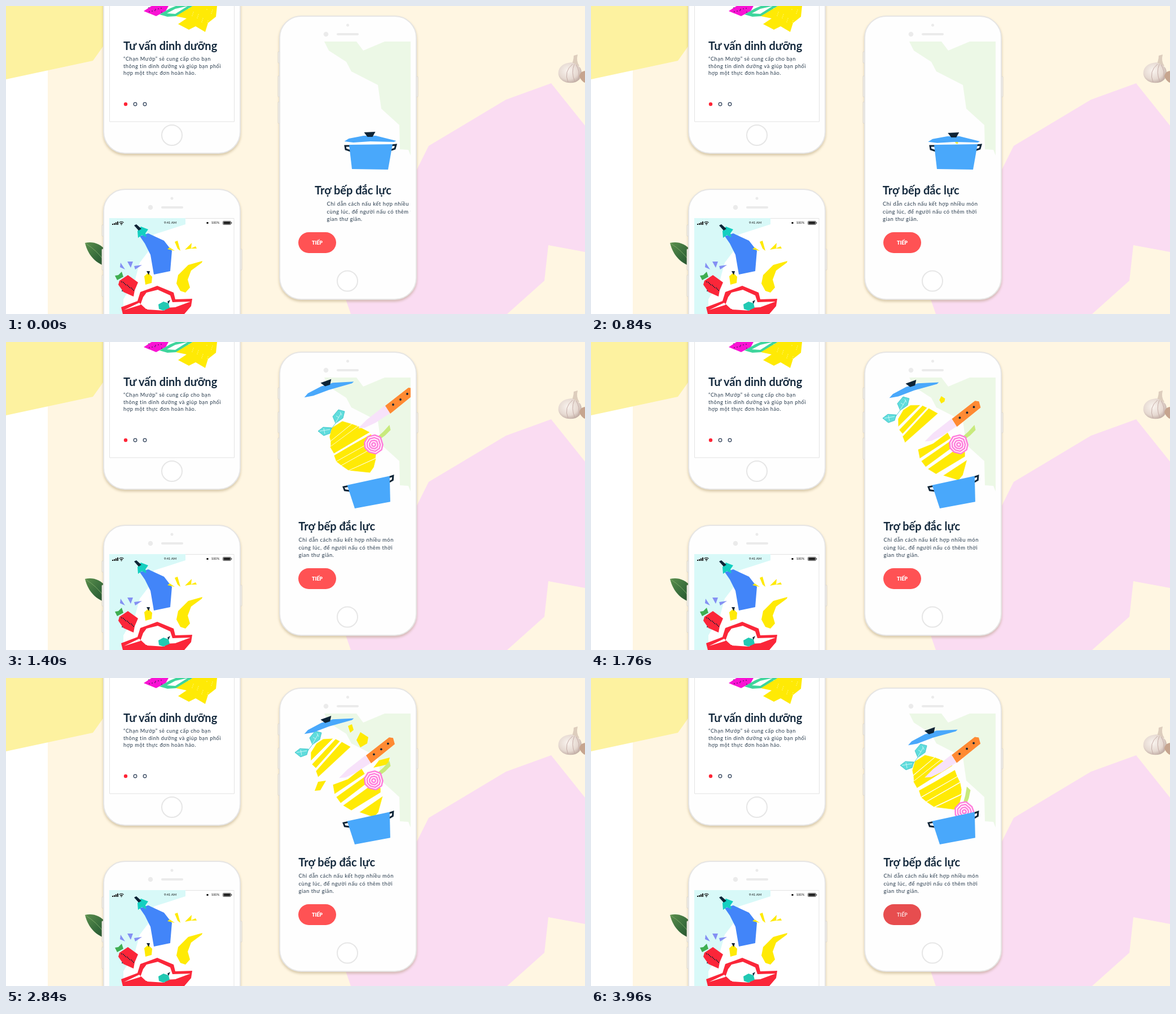
Animation of 1026x546 px, one loop 4000 ms. Source, as an HTML page:

```html
<!DOCTYPE html>
<html lang="vi">
<head>
<meta charset="utf-8">
<style>
html, body { margin: 0; width: 100%; height: 100%; overflow: hidden; background: #fff6e2; }
svg { display: block; width: 1026px; height: 546px; }
text { font-family: Lato, "Noto Sans", sans-serif; }
.title { font-size: 20px; font-weight: 700; fill: #14293d; }
.body { font-size: 9.4px; letter-spacing: .55px; fill: #26394b; }
.phone { fill: #fefefe; stroke: #e6e5e4; stroke-width: 2; filter: drop-shadow(0 3px 2px rgba(140,115,60,.34)); }
.side { fill: #fcfcfc; stroke: #dedbd6; stroke-width: .8; }
.grey { fill: #ebebeb; }
.home { fill: #fff; stroke: #e6e6e6; stroke-width: 2; }
.dark { fill: #0e2436; }
.yel { fill: #ffea05; }
.blue { fill: #49a8fb; }
</style>
</head>
<body>
<svg viewBox="0 0 1026 546" xmlns="http://www.w3.org/2000/svg">
<defs>
  <clipPath id="screen"><rect x="490" y="63" width="227" height="400"/></clipPath>
  <clipPath id="low"><rect x="183" y="376" width="221" height="170"/></clipPath>
  <linearGradient id="leafFill" x1="0" y1="0" x2="1" y2="1">
    <stop offset="0" stop-color="#5b8f4d"/><stop offset=".6" stop-color="#34693a"/><stop offset="1" stop-color="#234b2b"/>
  </linearGradient>
  <radialGradient id="bulb" cx=".42" cy=".4" r=".65">
    <stop offset="0" stop-color="#faf4ef"/><stop offset=".65" stop-color="#e6d9d1"/><stop offset="1" stop-color="#bda9a0"/>
  </radialGradient>
</defs>

<rect width="1026" height="546" fill="#fff6e2"/>
<rect y="100" width="74" height="446" fill="#fff"/>
<path d="M0 0H176V66L154 97 0 130Z" fill="#fdf2a0"/>
<path d="M602 520 729 288 749 248 886 166 966 137 1026 212V436L961 424 954 487 888 546H611Z" fill="#fadcf2"/>

<g>
  <path d="M1006 88 1013 86Q1010 98 1016 106L1000 108Q1006 98 1006 88Z" fill="#ddcdbd"/>
  <path d="M1002 100C986 101 977 110 979 122 982 134 996 139 1009 135 1019 131 1023 120 1018 110Q1012 103 1002 100Z" fill="url(#bulb)"/>
  <path d="M1004 103Q988 116 996 135M1007 103Q1001 118 1008 134M1010 104Q1018 116 1014 130" fill="none" stroke="#c6ada8" stroke-width="1"/>
  <path d="M1026 115Q1017 116 1016 125 1020 134 1026 136Z" fill="#c6a58f"/>
</g>
<path d="M140 420C153 417 166 420 178 434V462C160 456 146 444 140 420Z" fill="url(#leafFill)"/>
<path d="M141 421Q160 432 175 453" fill="none" stroke="#7ba869" stroke-width="1"/>

<!-- upper left phone -->
<rect class="phone" x="173" y="-240" width="242" height="501" rx="38"/>
<path d="M183.500 0V205H404.500V0" fill="#fff" stroke="#e3e3e3"/>
<circle class="home" cx="294" cy="229" r="18"/>
<path d="M244 9 258 0H288L283 9 266 18Z" fill="#f913d4"/>
<path d="M272 15 291 4 301 0H331L302 18 286 19Z" fill="#3ed59c"/>
<path d="M285 13 300 5 322 0 300 14Z" fill="#fff"/>
<path class="yel" d="M331 0 301 18 320 22 305 32 324 42 336 36 353 46 358 30 372 19 374 0Z"/>
<g id="specks" class="dark"></g>
<text class="title" x="208" y="78">Tư vấn dinh dưỡng</text>
<g class="body" style="font-size:9.2px;letter-spacing:.53px">
  <text x="208" y="97">“Chạn Mướp” sẽ cung cấp cho bạn</text>
  <text x="208" y="109.700">thông tin dinh dưỡng và giúp bạn phối</text>
  <text x="208" y="122.400">hợp một thực đơn hoàn hảo.</text>
</g>
<circle cx="212" cy="174" r="3.200" fill="#ff2436"/>
<g fill="#fff" stroke="#2a3c55" stroke-width="1.200"><circle cx="229" cy="174" r="2.800"/><circle cx="246" cy="174" r="2.800"/></g>

<!-- lower left phone -->
<g class="side">
  <rect x="170" y="388" width="4" height="20" rx="1"/><rect x="170" y="431" width="4" height="37" rx="1"/>
  <rect x="170" y="477" width="4" height="38" rx="1"/><rect x="414" y="431" width="4" height="37" rx="1"/>
</g>
<rect class="phone" x="173" y="325" width="242" height="501" rx="38"/>
<g class="grey"><circle cx="294" cy="341" r="2.500"/><circle cx="256" cy="357" r="4.300"/><rect x="275" y="355" width="39" height="4" rx="2"/></g>
<path d="M183.500 546V376.500H404V546" fill="#fff" stroke="#e3e3e3"/>
<g clip-path="url(#low)">
  <path d="M183 376H318V387L284 398 262 405 253 434 237 455 229 484 208 520V546H183Z" fill="#d8f9f8"/>
  <path d="M237 408 252 403 280 416 294 434 291 470 262 476 256 441 246 421Z" fill="#4285f9"/>
  <path d="M234 411 233 399 239 391 252 396 247 403 249 410 241 406Z" fill="#14cfc0"/>
  <path class="dark" d="M227 389 231 387 240 395 235 398Z"/>
  <path class="yel" d="M286 431 290 428 299 434ZM299 418 304 416 309 434 304 430ZM317 432 329 420 328 430ZM327 430 336 426 338 430Z"/>
  <path class="yel" d="M348 452 323 459 305 477 302 492 309 505 318 508 326 499 322 485 328 469 347 455Z"/>
  <path d="M203 455 211 467 202 463ZM215 453 225 453 221 464ZM227 461 241 459 229 467Z" fill="#8490f3"/>
  <path d="M193 478 199 477 205 471 208 480 197 486Z" fill="#3fae52"/>
  <path d="M201 487 216 477 234 490 228 504 226 515 208 507 199 494Z" fill="#fb2639"/>
  <path class="yel" d="M245 479 252 473 259 480 258 491 247 494Z"/>
  <path class="dark" d="M249 470 255 470 253 477Z"/>
  <path d="M204 534 233 523 238 507 268 496 297 508 300 520 330 519 328 532 316 546H207Z" fill="#fb2639"/>
  <path d="M243 516 249 508 269 503 291 513 295 525 327 524 300 534 248 537 236 526 209 539 238 530Z" fill="#fff"/>
  <path d="M246 514 268 506 288 514 294 528 280 540 250 538Z" fill="#fff"/>
  <path d="M270 529 279 524 288 527 290 535 279 540 271 537Z" fill="#21c9b3"/>
  <path class="dark" d="M286 524 291 521 288 528Z"/>
  <g id="seeds" class="dark"></g>
</g>
<g fill="#111">
  <path d="M188 386h2v2h-2zM191 385h2v3h-2zM194 383.500h2v4.500h-2zM197 382h2v6h-2z"/>
  <path d="M200.500 384Q204.500 380.500 208.500 384M202.300 386Q204.500 384 206.700 386" fill="none" stroke="#111" stroke-width="1.200"/>
  <circle cx="204.500" cy="387.500" r=".9"/>
  <rect x="355.500" y="383" width="3" height="3"/>
  <rect x="384.500" y="381.500" width="14" height="6" rx="1" fill="none" stroke="#111" stroke-width=".7"/>
  <rect x="385.500" y="382.500" width="12" height="4"/><rect x="399.300" y="383.500" width="1" height="2"/>
  <text x="291" y="386.300" font-size="5.800" text-anchor="middle">9:41 AM</text>
  <text x="371" y="386.300" font-size="5.800" text-anchor="middle">100%</text>
</g>

<!-- main phone -->
<g class="side">
  <rect x="482" y="81" width="4" height="20" rx="1"/><rect x="482" y="124" width="4" height="37" rx="1"/>
  <rect x="482" y="170" width="4" height="38" rx="1"/><rect x="726" y="125" width="4" height="36" rx="1"/>
</g>
<rect class="phone" x="485" y="18" width="242" height="502" rx="38"/>
<g class="grey"><circle cx="605.500" cy="34" r="2.500"/><circle cx="567" cy="50" r="4.300"/><rect x="586" y="48" width="39" height="4" rx="2"/></g>
<circle class="home" cx="605" cy="487.500" r="18"/>
<g clip-path="url(#screen)">
  <path d="M564 63H621L633 79 671 63H717V265L713 255 698 254 697 211 665 182 659 140 612 116 603 99 572 79Z" fill="#ecf8e6"/>
  <g id="lemon">
    <g id="slices" class="yel" stroke="#fff" stroke-width=".7"></g>
    <g id="leaves" fill="#5fdcdc" stroke="#35bfc4" stroke-width=".8">
      <path d="M575 156 584 144" fill="none"/>
      <path d="M579 132 589 120 600 123 597 135 584 144Z"/>
      <path d="M553 158 562 151 577 152 574 162 563 166Z"/>
      <path d="M584 143 594 126M556 158 574 155M585 131 590 134M592 124 595 130M563 153 565 163" stroke="#e2fbfa" fill="none"/>
    </g>
  </g>
  <g id="bits" class="yel"></g>
  <g id="knife">
    <path d="M589 178 604 163 636 138 646 151 620 168 601 177Z" fill="#f7e2fa"/>
    <path d="M637 138 678 106 685 107 688 118 646 152Z" fill="#ff8a33"/>
    <g class="dark"><circle cx="651" cy="136" r="1.900"/><circle cx="664" cy="127" r="1.900"/><circle cx="676" cy="117" r="1.900"/></g>
  </g>
  <g id="onion">
    <path d="M8-15 17-23 28-35 30-26 20-16 13-11Z" fill="#c8ea7c"/>
    <g id="rings" fill="#fff" stroke="#ff7fdc" stroke-linejoin="round"></g>
  </g>
  <g id="pot">
    <path d="M609 248 601 248 602 254 611 257M683 247 691 246 689 253 680 256" fill="none" stroke="#0e2436" stroke-width="3"/>
    <path class="blue" d="M608 246 685 245 677 290 613 289Z"/>
  </g>
  <g id="lid">
    <path class="blue" d="M-46 4-38-1-12-6 10-6 46 3 42 5 0 4-30 6Z"/>
    <path class="dark" d="M-11-12 9-13 4-4-5-4Z"/>
  </g>
  <text id="title" class="title" y="334">Trợ bếp đắc lực</text>
  <g id="copy" class="body">
    <text y="354">Chỉ dẫn cách nấu kết hợp nhiều món</text>
    <text y="367.500">cùng lúc, để người nấu có thêm thời</text>
    <text y="381">gian thư giãn.</text>
  </g>
</g>
<rect id="button" x="518" y="401" width="67" height="37" rx="18.500"/>
<text id="label" x="551.500" y="423" font-size="9" text-anchor="middle">TIẾP</text>
</svg>
<script>
const NS = 'http://www.w3.org/2000/svg';
const $ = id => document.getElementById(id);
const set = (el, attrs) => { for (const k in attrs) el.setAttribute(k, attrs[k]); return el; };
const add = (parent, tag, attrs = {}) => parent.appendChild(set(document.createElementNS(NS, tag), attrs));
const move = (id, value) => $(id).setAttribute('transform', value);
const about = (x, y, s) => `translate(${x} ${y}) scale(${s}) translate(${-x} ${-y})`;

const smooth = p => p * p * (3 - 2 * p);
const out = p => 1 - (1 - p) ** 3;

// Value at time t from [time, value] keys
function keyed(t, keys, ease = smooth) {
  if (t <= keys[0][0]) return keys[0][1];
  for (let i = 1; i < keys.length; i++) {
    const [a, v] = keys[i - 1], [b, w] = keys[i];
    if (t <= b) return v + (w - v) * ease((t - a) / (b - a));
  }
  return keys[keys.length - 1][1];
}

// Each slice: closed outline, then open outline
const slices = [
  [[573,168, 577,152, 596,140, 613,145, 575,176], [540,132, 550,116, 562,108, 580,107, 540,147]],
  [[613,145, 624,149, 575,186, 575,176], [584,108, 592,112, 549,160, 542,153]],
  [[624,149, 645,160, 581,198, 574,186], [595,113, 611,122, 553,176, 549,165]],
  [[581,201, 610,184, 647,163, 651,175, 585,212], [579,189, 606,179, 630,160, 636,170, 582,206]],
  [[585,212, 651,175, 655,185, 594,219], [585,211, 638,173, 647,181, 593,222]],
  [[594,219, 655,185, 656,198, 655,206, 607,228], [597,226, 651,187, 664,195, 664,203, 612,235]],
  [[607,228, 656,206, 652,222, 645,232], [626,238, 668,209, 660,238, 652,247]]
].map(([shut, open]) => ({ shut, open, el: add($('slices'), 'polygon') }));

// Offcuts: outline, centre, start time
const bits = [
  ['628,96 642,105 640,116 628,123 621,110', 632, 110, 1600],
  ['606,85 613,82 616,92 610,97', 611, 89, 1770],
  ['547,200 553,184 567,182 557,199', 556, 191, 1770],
  ['651,159 661,146 680,141 677,153', 666, 150, 1790]
].map(([points, x, y, from]) => ({ x, y, from, el: add($('bits'), 'polygon', { points }) }));

for (const s of [1, .73, .46, .2])
  add($('rings'), 'path', {
    d: 'M-16-4-10-14 2-17 12-13 16 0 14 9 4 16-8 13-15 6Z',
    transform: `scale(${s})`, 'stroke-width': 2.6 / s
  });

for (let i = 0; i < 11; i++)
  add($('seeds'), 'circle', { cx: 205 + i * 7 % 23, cy: 489 + i * 5 % 17, r: .9 });
for (let i = 0; i < 8; i++)
  add($('specks'), 'circle', { cx: 253 + i * 11 % 27, cy: 3 + i * 5 % 9, r: .8 });
for (let i = 0; i < 16; i++)
  add($('specks'), 'circle', { cx: 324 + i * 17 % 43, cy: 4 + i * 11 % 26, r: .6, fill: '#fff' });

const titleX = [[0, 28.7], [260, -8], [600, -2], [840, -1.5], [1300, 0]];
const copyX = [[0, 50], [340, -11], [620, -2], [840, -1.5], [1300, 0]];
const spread = [[1410, 0], [1760, .88], [2000, 1.03], [2300, 1], [3500, 1], [3960, .12]];
const lidX = [[700, 0], [840, .03], [1340, 1], [3620, 1], [3960, .55]];
const lidY = [[700, 0], [840, -.006], [1360, 1.01], [1480, 1], [3620, 1], [3960, .87]];
const tilt = [[840, 0], [1140, -13], [1320, -11.5]];
const grow = [[790, 0], [840, .06], [1240, 1.03], [1380, 1]];
const rise = [[900, 0], [1280, 1.04], [1390, 1]];
const sink = [[3640, 0], [3960, 1]];
const stab = [[1160, 4], [1400, 1], [1620, -.06], [1760, .07], [2400, 0], [3360, .06]];

function draw(t) {
  move('title', `translate(${518.3 + keyed(t, titleX)} 0)`);
  move('copy', `translate(${518.5 + keyed(t, copyX)} 0)`);

  const s = keyed(t, spread);
  for (const { shut, open, el } of slices)
    el.setAttribute('points', shut.map((v, i) => v + (open[i] - v) * s).join(' '));
  move('leaves', `translate(${-41 * s} ${-26 * s})`);
  move('lemon', about(650, 245, keyed(t, grow)));

  for (const { x, y, from, el } of bits) {
    const g = keyed(t, [[from, 0], [from + 330, 1], [3500, 1], [3850, 0]]);
    el.setAttribute('transform', `translate(${-18 * (1 - g)} ${-14 * (1 - g)}) ` + about(x, y, g));
  }

  const k = keyed(t, stab, t < 1400 ? p => p : t < 1620 ? out : smooth);
  move('knife', `translate(${35 * k} ${-25 * k})`);

  const d = keyed(t, sink);
  move('onion', about(655, 245, keyed(t, rise)) +
    ` translate(${651.5 + 10 * d} ${182 + 55 * d}) rotate(${-33 * d})`);

  move('pot', `rotate(${keyed(t, tilt)} 645 267)`);
  const lx = keyed(t, lidX), ly = keyed(t, lidY);
  move('lid', `translate(${645.5 - 74 * lx} ${236 - 154 * ly}) rotate(${-17 * Math.min(1, ly * 1.6)})`);

  const pressed = t >= 3960;
  set($('button'), { fill: pressed ? '#e74d4f' : '#ff5254' });
  set($('label'), { fill: pressed ? '#fbdcdc' : '#fff', 'font-weight': pressed ? 700 : 900 });
}

function tick() {
  draw(Math.floor(performance.now() % 4000 / 40) * 40);
  requestAnimationFrame(tick);
}
tick();
</script>
</body>
</html>
```
